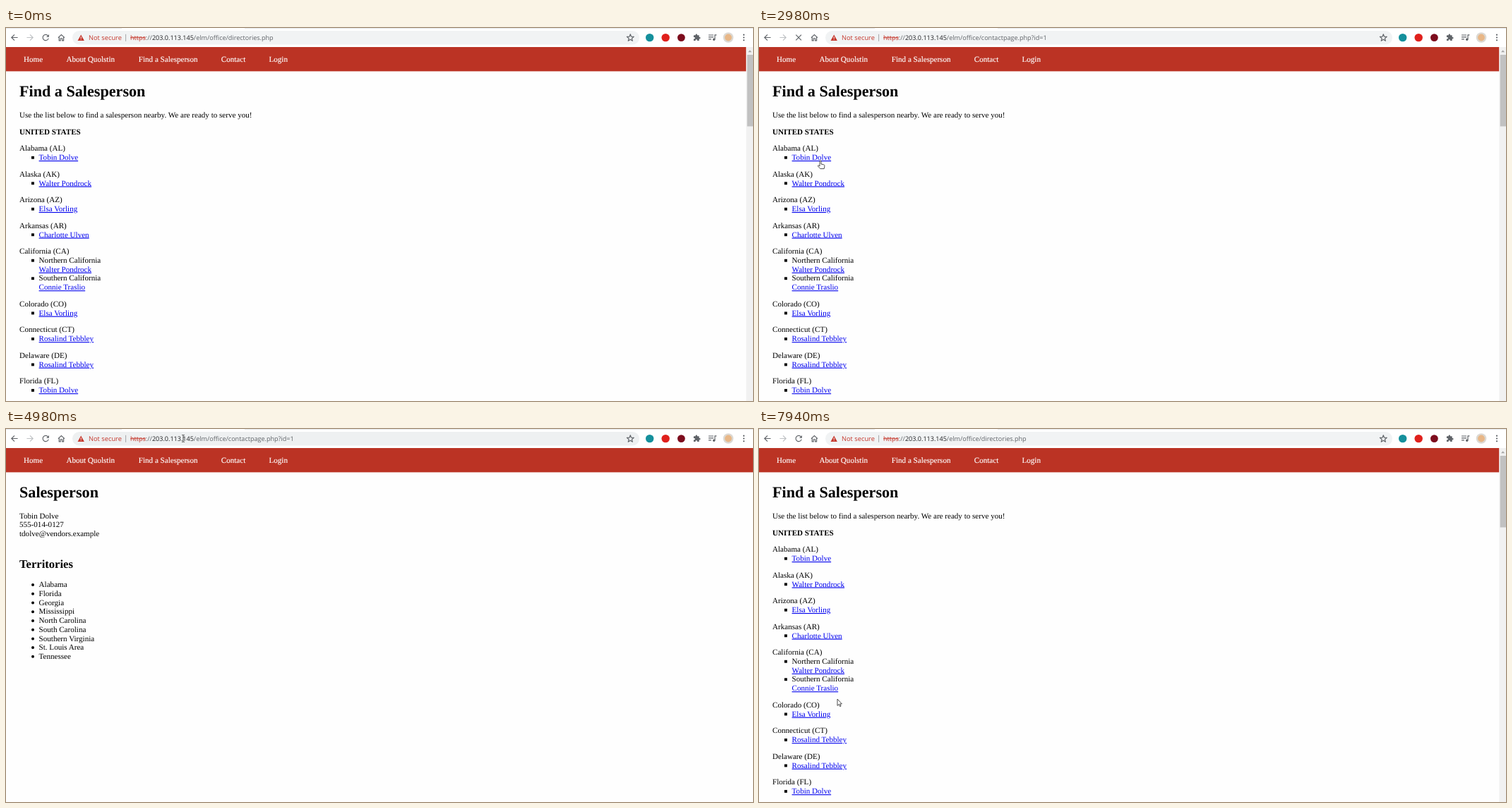
An HTML page that plays this animation: 1058x529 px, repeating every 8 s.

```html
<!DOCTYPE html>
<html lang="en">
<head>
<meta charset="utf-8">
<title>Find a Salesperson</title>
<style>
  html, body { margin: 0; width: 100%; height: 100%; overflow: hidden; background: #fefefe; }
  svg { display: block; width: 1058px; height: 529px; }
  text { text-rendering: geometricPrecision; font-variant-ligatures: none; white-space: pre; }
  .page, .nav { font: 11.08px "Liberation Serif", "Times New Roman", serif; }
  .nav { fill: #fff; stroke: #fff; stroke-width: .15; }
  .h1 { font-size: 22.15px; font-weight: bold; }
  .h2 { font-size: 16.6px; font-weight: bold; }
  .b { font-weight: bold; }
  .link { fill: #0000ee; text-decoration: underline; }
  .bar { font: 9.05px "Open Sans", "Noto Sans", sans-serif; fill: #5f6368; }
  .line { fill: none; stroke: #5f6368; stroke-width: 1.15; }
</style>
</head>
<body>
<svg viewBox="0 0 1058 529" xmlns="http://www.w3.org/2000/svg">
  <rect width="1058" height="529" fill="#fefefe"/>
  <g id="list" class="page"></g>
  <g id="person" class="page"></g>

  <rect id="navBg" y="27" height="34.4" fill="#bb3324"/>
  <g id="nav" class="nav"></g>

  <g id="scroll">
    <rect x="1048.4" y="27" width="9.6" height="502" fill="#f1f1f1"/>
    <rect x="1049.7" y="38" width="8.3" height="101.5" fill="#c1c1c1"/>
    <path d="M1051 34.2L1053.6 31.4L1056.2 34.2Z" fill="#a3a3a3"/>
  </g>

  <rect width="1058" height="27" fill="#fff"/>
  <path d="M0 0H164V.8H0ZM338 0H1058V.8H338Z" fill="#dee1e6"/>
  <rect id="omni" x="94" y="4" width="803" height="19.6" rx="9.8"/>
  <path class="line" d="M16.6 13.5H8M12 9.3L7.8 13.5L12 17.7"/>
  <path class="line" d="M29.4 13.5H38M34 9.3L38.2 13.5L34 17.7" style="stroke:#bfc1c4"/>
  <g id="reload">
    <path class="line" d="M59.4 10.9A4.1 4.1 0 1 0 60.2 14.6"/>
    <path d="M60.9 8.9V12.7H57.1Z" fill="#5f6368"/>
  </g>
  <path id="stop" class="line" d="M52.3 9.7l7.6 7.6m0-7.6l-7.6 7.6"/>
  <path class="line" d="M73.9 13.7L78.4 9.5L82.9 13.7M75.2 12.8V17.8H77.2V14.7H79.6V17.8H81.6V12.8"/>

  <path d="M106.2 9.6L110.9 17.9H101.5Z" fill="#c5372c"/>
  <path d="M106.2 12.4V14.9M106.2 15.7V16.7" stroke="#fff" stroke-width="1"/>
  <text class="bar" x="117" y="17.2" style="font-size:9.3px;fill:#c5372c">Not secure</text>
  <path d="M169.6 8.8V18.8" stroke="#9a9da1" stroke-width=".9"/>
  <text class="bar" x="176" y="17.2"><tspan fill="#c5372c" text-decoration="line-through">https</tspan>://<tspan fill="#202124">203.0.113.145</tspan><tspan id="path"></tspan></text>

  <path id="star" class="line" stroke-linejoin="round"/>
  <circle cx="911.7" cy="13.6" r="5.7" fill="#15909c"/>
  <circle cx="934.2" cy="13.6" r="5.7" fill="#e0201c"/>
  <circle cx="956.4" cy="13.6" r="5.4" fill="#7d0c1d"/>
  <path transform="translate(973 8) scale(.46)" fill="#5f6368" d="M20.5 11H19V7c0-1.1-.9-2-2-2h-4V3.5C13 2.1 11.9 1 10.5 1S8 2.1 8 3.5V5H4c-1.1 0-2 .9-2 2v3.8h1.5c1.5 0 2.7 1.2 2.7 2.7s-1.2 2.7-2.7 2.7H2V20c0 1.1.9 2 2 2h3.8v-1.5c0-1.5 1.2-2.7 2.7-2.7s2.7 1.2 2.7 2.7V22H17c1.1 0 2-.9 2-2v-4h1.5a2.5 2.5 0 0 0 0-5z"/>
  <path class="line" d="M995 10H1002M995 12.9H1002M995 15.8H999M1004 16V9.8H1006.4"/>
  <circle cx="1002.7" cy="16.2" r="1.7" fill="#5f6368"/>
  <circle cx="1023" cy="13.5" r="7.3" fill="#dcd9d4"/>
  <circle cx="1023" cy="13.5" r="4.9" fill="#e8b787"/>
  <g fill="#5f6368">
    <circle cx="1045" cy="9.7" r="1.1"/><circle cx="1045" cy="13.5" r="1.1"/><circle cx="1045" cy="17.3" r="1.1"/>
  </g>

  <g id="cursor" fill="#fff" stroke="#222" stroke-width=".8" stroke-linejoin="round">
    <path id="arrow" d="M0 0V9.4L2.2 7.4L3.7 10.6L5.1 10L3.7 6.9H6.4Z"/>
    <path id="beam" fill="none" d="M-1.8 -5H-.6L0 -4.4L.6 -5H1.8M0 -4.4V4.4M-1.8 5H-.6L0 4.4L.6 5H1.8"/>
    <path id="hand" d="M-1 1C-1 -.3 1 -.3 1 1V5L4.5 5.8C5.6 6 6 6.6 5.9 7.6L5.2 11.6H-.2L-3.4 8C-3.9 7.2 -3 6.4 -2.2 7L-1 8Z"/>
  </g>
</svg>
<script>
const LOOP = 8000, LINE = 12.73, GAP = 11.03, LEFT = 19, INDENT = 46.6;
const $ = id => document.getElementById(id);
const show = (id, on) => { $(id).style.display = on ? "" : "none"; };
const text = (x, y, s, cls = "") => `<text x="${x}" y="${y}" class="${cls}">${s}</text>`;
const square = y => `<rect x="36" y="${y - 5.2}" width="3.9" height="3.9"/>`;
const disc = y => `<circle cx="38" cy="${y - 3.2}" r="2"/>`;

// Sales people
const tobin = "Tobin Dolve", walter = "Walter Pondrock", elsa = "Elsa Vorling",
      charlotte = "Charlotte Ulven", connie = "Connie Traslio", rosalind = "Rosalind Tebbley";

// State, then its items: a name, or [area, name]
const states = [
  ["Alabama (AL)", tobin],
  ["Alaska (AK)", walter],
  ["Arizona (AZ)", elsa],
  ["Arkansas (AR)", charlotte],
  ["California (CA)", ["Northern California", walter], ["Southern California", connie]],
  ["Colorado (CO)", elsa],
  ["Connecticut (CT)", rosalind],
  ["Delaware (DE)", rosalind],
  ["Florida (FL)", tobin]
];

function buildList() {
  let out = text(LEFT, 96.5, "Find a Salesperson", "h1")
    + text(LEFT, 126.7, "Use the list below to find a salesperson nearby. We are ready to serve you!")
    + text(LEFT, 150.5, "UNITED STATES", "b");
  let y = 174.3;
  for (const [state, ...items] of states) {
    out += text(LEFT, y, state);
    for (const item of items) {
      out += square(y + LINE);
      for (const s of [item].flat()) {
        y += LINE;
        out += text(INDENT, y, s, Array.isArray(item) && s === item[0] ? "" : "link");
      }
    }
    y += LINE + GAP;
  }
  return out;
}

function buildPerson() {
  const areas = ["Alabama", "Florida", "Georgia", "Mississippi", "North Carolina",
    "South Carolina", "Southern Virginia", "St. Louis Area", "Tennessee"];
  const contact = [tobin, "555-014-0127", "tdolve@vendors.example"];
  return text(LEFT, 96.5, "Salesperson", "h1")
    + contact.map((s, i) => text(LEFT, 126.7 + i * LINE, s)).join("")
    + text(LEFT, 196.5, "Territories", "h2")
    + areas.map((s, i) => {
        const y = 224.2 + i * LINE;
        return disc(y) + text(INDENT, y, s);
      }).join("");
}

function starPath() {
  const pts = [];
  for (let i = 0; i < 10; i++) {
    const r = i % 2 ? 2.2 : 5.2, a = i * Math.PI / 5;
    pts.push((884.3 + r * Math.sin(a)).toFixed(2) + " " + (14 - r * Math.cos(a)).toFixed(2));
  }
  return "M" + pts.join("L") + "Z";
}

$("list").innerHTML = buildList();
$("person").innerHTML = buildPerson();
$("star").setAttribute("d", starPath());
$("nav").innerHTML = [[25, "Home"], [85.4, "About Quolstin"], [187.8, "Find a Salesperson"],
  [304.8, "Contact"], [372.5, "Login"]].map(([x, s]) => text(x, 48.3, s)).join("");

// Pointer: time, x, y, shape from here on
const moves = [
  [610, 1050, 505, "arrow"], [880, 560, 190], [1100, 270, 50],
  [1220, 226, 16, "beam"], [1420, 226, 16, "arrow"],
  [1690, 141, 91, "beam"], [1760, 128, 112, "arrow"],
  [2160, 87, 187], [2230, 87, 188, "hand"],
  [3300, 87, 188, "arrow"], [3570, 368, 67], [3780, 416, 42],
  [4040, 350, 22, "beam"], [4110, 344, 15], [4320, 330, 13], [4780, 330, 13],
  [4980, 252, 13], [5120, 236, 20], [5190, 222, 32, "hand"], [5325, 205, 47],
  [5670, 205, 47], [5800, 204, 46], [6200, 204, 46], [6470, 220, 45],
  [7660, 220, 45], [7710, 205, 95, "arrow"], [7940, 111, 383], [LOOP, 111, 383]
];

const TICK = 67.2;
const tick = t => Math.floor((t - 2) / TICK) * TICK + 16;

function pointer(t) {
  if (t < moves[0][0]) return null;
  let i = 0, shape;
  while (i < moves.length - 1 && moves[i][0] <= t) shape = moves[i++][3] || shape;
  const [t0, x0, y0] = moves[i - 1], [t1, x1, y1] = moves[i];
  const k = Math.min(1, (t - t0) / (t1 - t0));
  return { x: x0 + (x1 - x0) * k, y: y0 + (y1 - y0) * k, shape };
}

const within = (t, a, b) => t >= a && t < b;

function draw(t) {
  const person = within(t, 3045, 7410);
  const loading = within(t, 2510, 3110) || within(t, 6730, 7410);
  show("list", !person);
  show("person", person);
  show("scroll", !person);
  show("stop", loading);
  show("reload", !loading);
  $("navBg").setAttribute("width", person ? 1058 : 1048.4);
  $("path").textContent = "/elm/office/"
    + (within(t, 2980, 7000) ? "contactpage.php?id=1" : "directories.php");

  const p = pointer(tick(t));
  show("cursor", p);
  $("omni").setAttribute("fill", p && p.y < 24 ? "#eef0f1" : "#f1f3f4");
  if (!p) return;
  $("cursor").setAttribute("transform", `translate(${p.x} ${p.y})`);
  for (const s of ["arrow", "beam", "hand"]) show(s, s === p.shape);
}

const start = performance.now();
function loop() {
  draw((performance.now() - start) % LOOP);
  requestAnimationFrame(loop);
}
loop();
</script>
</body>
</html>
```
